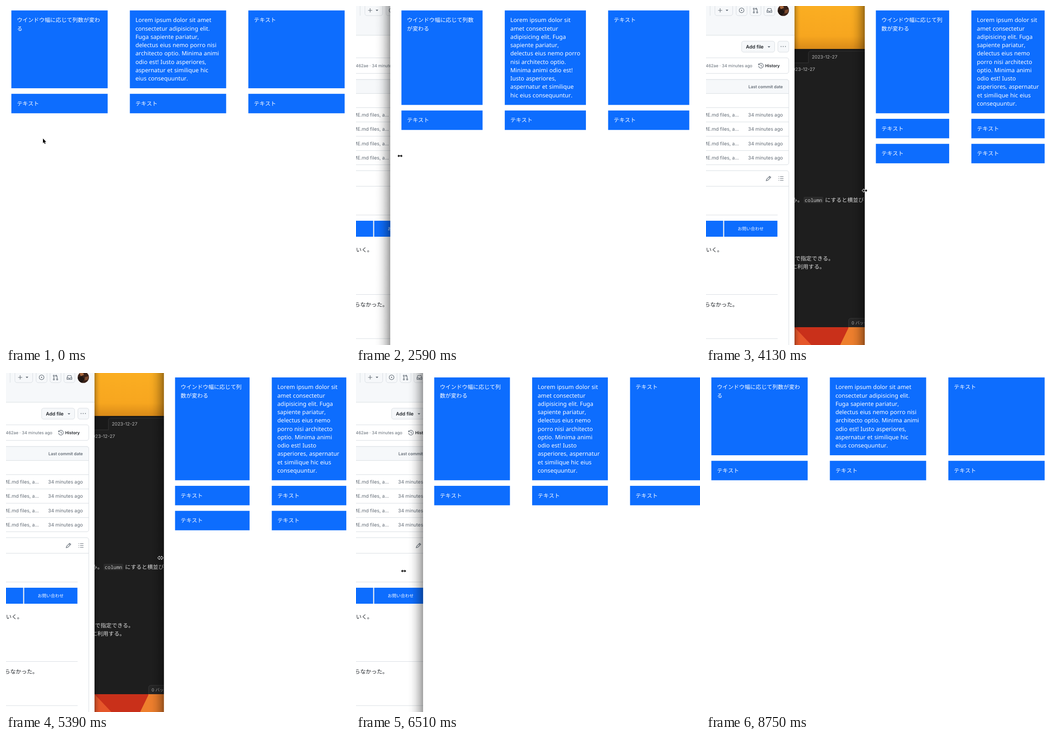
Recreate the animation shown at these times as an HTML page with a canvas. Size 754x742 px, loop 9.45 s.

```html
<!DOCTYPE html>
<html lang="ja">
<head>
<meta charset="utf-8">
<title>Responsive grid</title>
<style>
html, body { margin: 0; width: 100%; height: 100%; overflow: hidden; background: #fff; }
canvas { display: block; }
</style>
</head>
<body>
<canvas id="stage" width="754" height="742"></canvas>
<script>
const W = 754, H = 742, LOOP = 9450, STEP = 70;
const ctx = document.getElementById('stage').getContext('2d');
const JP = '"Noto Sans CJK JP", "Noto Sans CJK", sans-serif';
const UI = 'Inter, "Noto Sans CJK JP", sans-serif';
const BLUE = '#0d6dfe', LINE = '#d8dde2', INK = '#1f2328', GREY = '#636c76';

// Page metrics: one rem on the scaled screen
const REM = 12.167, LH = REM * 1.5, RIGHT = 766.6, MIN_COL = REM * 12.5;
const LOREM = 'Lorem ipsum dolor sit amet consectetur adipisicing elit. Fuga sapiente pariatur, delectus eius nemo porro nisi architecto optio. Minima animi odio est! Iusto asperiores, aspernatur et similique hic eius consequuntur.';
const CARDS = ['ウインドウ幅に応じて列数が変わる', LOREM, 'テキスト', 'テキスト', 'テキスト', 'テキスト'];

// [time, value]
const EDGE = [[0, -12.6], [2230, -12.6], [2520, 60], [3080, 174], [3600, 262], [4130, 348],
  [5320, 348], [5600, 325], [5880, 270.7], [6160, 243], [6200, 243], [6650, 90],
  [7070, -44], [7350, -44], [8120, -12.6], [9450, -12.6]];
const HAND_Y = [[0, 316], [2230, 316], [3080, 358], [4130, 404], [5320, 404], [5880, 422], [7070, 438], [9450, 438]];
const ARROW_X = [[0, 81], [140, 48], [350, 6], [490, 6]];
const ARROW_Y = [[0, 290], [350, 302], [490, 302]];

function slope(k, i) {
  if (i === 0 || i === k.length - 1) return 0;
  const [a, b, c] = [k[i - 1], k[i], k[i + 1]];
  if ((b[1] - a[1]) * (c[1] - b[1]) <= 0) return 0;
  return (c[1] - a[1]) / (c[0] - a[0]);
}

// Smooth curve through keys, flat at turning points
function curve(k, t) {
  if (t <= k[0][0]) return k[0][1];
  const i = k.findIndex(p => p[0] > t) - 1;
  if (i < 0) return k[k.length - 1][1];
  const [t0, a] = k[i], [t1, b] = k[i + 1];
  const d = t1 - t0, s = (t - t0) / d, s2 = s * s, s3 = s2 * s;
  return a + (b - a) * (3 * s2 - 2 * s3)
    + d * (s - 2 * s2 + s3) * slope(k, i) + d * (s3 - s2) * slope(k, i + 1);
}

function rect(x, y, w, h, fill) {
  ctx.fillStyle = fill;
  ctx.fillRect(x, y, w, h);
}

function box(x, y, w, h, r, fill, stroke) {
  ctx.beginPath();
  ctx.roundRect(x, y, w, h, r);
  if (fill) { ctx.fillStyle = fill; ctx.fill(); }
  if (stroke) { ctx.strokeStyle = stroke; ctx.lineWidth = 1; ctx.stroke(); }
}

function poly(points, fill) {
  ctx.beginPath();
  points.forEach(([x, y]) => ctx.lineTo(x, y));
  ctx.closePath();
  ctx.fillStyle = fill;
  ctx.fill();
}

function label(str, x, y, font, fill, align = 'left') {
  ctx.font = font;
  ctx.fillStyle = fill;
  ctx.textAlign = align;
  ctx.fillText(str, x, y);
}

function icon(path, x, y, color = GREY, width = 1.2) {
  ctx.save();
  ctx.translate(x, y);
  ctx.strokeStyle = color;
  ctx.lineWidth = width;
  ctx.stroke(new Path2D(path));
  ctx.restore();
}

function shadow(x, y, h, size, alpha) {
  const g = ctx.createLinearGradient(x, 0, x + size, 0);
  const from = size > 0 ? 0 : 1;
  for (let i = 0; i <= 4; i++) g.addColorStop(i / 4, `rgba(0,0,0,${alpha * (1 - i / 4) ** 2})`);
  rect(Math.min(x, x + size), y, Math.abs(size), h, g);
}

function drawWallpaper() {
  const top = ctx.createLinearGradient(0, 0, 0, 94);
  top.addColorStop(0, '#fbae22');
  top.addColorStop(.7, '#f7a61f');
  top.addColorStop(1, '#d98a18');
  rect(190, 0, 170, 94, top);
  rect(190, 703, 170, 39, '#c9301a');
  poly([[194, 703], [194, 742], [231, 742]], '#e5562a');
  poly([[313, 703], [360, 703], [360, 742], [294, 742]], '#ee7f2d');
}

function drawEditor() {
  rect(190, 94, 170, 609, '#1e1e1e');
  rect(190, 94, 170, 30, '#191919');
  box(224.5, 98.5, 160, 26, [5, 0, 0, 0], '#1e1e1e', '#353535');
  rect(190, 124, 34, 1, '#353535');
  rect(225, 124, 140, 2, '#1e1e1e');
  label('2023-12-27', 232, 114.5, '10px ' + UI, '#b9b9b9');
  label('2023-12-27', 239, 141.5, '10px ' + UI, '#b9b9b9', 'right');
  const font = '12.17px ' + JP, ink = '#dadada';
  label('み。', 188, 428.5, font, ink);
  box(214, 417.5, 43, 14, 3, '#2b2b2b');
  label('column', 216.3, 428.5, '10.7px "Noto Sans Mono", monospace', '#c8c8c8');
  label('にすると横並び', 261, 428.5, font, ink);
  label('で指定できる。', 195, 556.5, font, ink);
  label('に利用する。', 188, 574.8, font, ink);
  box(312.5, 683.5, 80, 24, [5, 0, 0, 0], '#262626', '#383838');
  rect(312, 703, 50, 6, '#ee7f2d');
  label('0 バックリンク', 319, 696.5, '9.2px ' + UI, '#b0b0b0');
}

function caret(x, y) {
  poly([[x - 3, y - 1.5], [x + 3, y - 1.5], [x, y + 1.8]], GREY);
}

function drawToolbar() {
  rect(0, 0, 194, 64, '#f6f8fa');
  rect(0, 63.5, 194, 1, LINE);
  rect(8.5, 0, 1, 21, LINE);
  for (const [x, w] of [[19.5, 39], [66, 24], [96.5, 24], [127, 24]]) box(x, -3, w, 24, 4.5, '#f6f8fa', LINE);
  icon('M-4.5 0H4.5M0-4.5V4.5', 31, 9.5);
  caret(46, 9.5);
  icon('M5.2 0A5.2 5.2 0 1 1-5.2 0A5.2 5.2 0 1 1 5.2 0M.7 0A.7.7 0 1 1-.7 0A.7.7 0 1 1 .7 0', 78, 9.5);
  icon('M-3.5-2V3M-2.2-3.6A1.4 1.4 0 1 1-5-3.6A1.4 1.4 0 1 1-2.2-3.6M-2.2 4.4A1.4 1.4 0 1 1-5 4.4A1.4 1.4 0 1 1-2.2 4.4M5 4.4A1.4 1.4 0 1 1 2.2 4.4A1.4 1.4 0 1 1 5 4.4M3.6 3V-2Q3.6-3.6 2-3.6H.2M2-5.6L0-3.6L2-1.6', 108.5, 9.5);
  icon('M-5.3 1L-3.4-4H3.4L5.3 1V4.4H-5.3ZM-5.3 1H-2L-1 2.6H1L2 1H5.3', 139, 9.5);
  ctx.save();
  ctx.beginPath();
  ctx.arc(169.5, 9.5, 12.3, 0, 7);
  ctx.clip();
  rect(157, -3, 26, 26, '#3a2219');
  poly([[157, 10], [166, 6], [172, 13], [165, 23], [157, 23]], '#1f1512');
  poly([[161, 0], [168, -2], [171, 4], [164, 7]], '#a8673c');
  poly([[173, 9], [181, 7], [179, 15], [172, 16]], '#7c4a2e');
  ctx.restore();
}

function drawRepo() {
  rect(0, 0, 194, H, '#fff');
  drawToolbar();
  const small = '9.1px ' + UI, medium = '10.4px ' + UI, bold = '600 9.1px ' + UI;
  box(78, 77, 72.5, 24, 4.5, '#f6f8fa', LINE);
  label('Add file', 87.5, 92.7, '600 10.4px ' + UI, INK);
  caret(138, 89.5);
  box(157.5, 77, 24, 24, 4.5, '#f6f8fa', LINE);
  for (const x of [164.5, 169.2, 174]) rect(x - .8, 87.8, 1.7, 1.7, GREY);

  box(-20, 113.5, 201.5, 34, 4.5, '#fff', LINE);
  label('b7462ae · 34 minutes ago', 101.5, 134.3, small, GREY, 'right');
  icon('M-4.6-2.4A5.2 5.2 0 1 1-5.2.8M-5.3-4.6V-1.8H-2.5M0-2.8V.4L2.2 1.6', 120.5, 130.5);
  label('History', 129.8, 134.3, bold, INK);

  box(-20, 161, 201.5, 186.5, 4.5, '#fff', LINE);
  box(-20, 161, 201.5, 30.5, [4.5, 4.5, 0, 0], '#f6f8fa', LINE);
  label('Last commit date', 168.5, 179.8, bold, GREY, 'right');
  for (let i = 0; i < 4; i++) {
    const y = 222 + i * 31.3;
    rect(0, y, 181, 1, LINE);
    label('README.md files, a...', 72, y + 20, medium, GREY, 'right');
    label('34 minutes ago', 168.5, y + 20, medium, GREY, 'right');
  }

  box(-20, 360.5, 201.5, 420, 4.5, '#fff', LINE);
  rect(0, 394, 181, 1, LINE);
  icon('M-5 5L-4.2 1.8L2.6-5L5-2.6L-1.8 4.2ZM1-3.4L3.4-1', 137, 377.5);
  icon('M-2-4H5.5M-2 0H5.5M-2 4H5.5M-5.5-4H-4M-5.5 0H-4M-5.5 4H-4', 164.3, 377.5);
  for (const y of [457, 631, 727.5]) rect(0, y, 157, 1, LINE);
  rect(0, 470, 156.5, 35, '#e4eaf2');
  rect(0, 470, 37.5, 35, BLUE);
  rect(40, 470, 116.5, 35, BLUE);
  label('お問い合わせ', 98, 490.8, '9.5px ' + JP, '#fff', 'center');
  label('いく。', 0, 537.5, '12.17px ' + JP, INK);
  label('らなかった。', -3, 657.5, '12.17px ' + JP, INK);
}

function cardFont(str) {
  const latin = str === LOREM;
  ctx.font = latin ? '12.7px "Noto Sans", sans-serif' : `${REM}px ${JP}`;
  ctx.wordSpacing = latin ? '0.35px' : '0px';
}

function wrap(str, width) {
  cardFont(str);
  const gap = str === LOREM ? ' ' : '';
  const lines = [];
  let line = '';
  for (const part of str.split(gap)) {
    const next = line ? line + gap + part : part;
    if (line && ctx.measureText(next).width > width) {
      lines.push(line);
      line = part;
    } else line = next;
  }
  return lines.concat(line);
}

function drawGrid(left, width) {
  const gap = REM * 4, inner = width - REM * 4;
  const cols = Math.max(1, Math.floor((inner + gap) / (MIN_COL + gap)));
  const w = (inner - gap * (cols - 1)) / cols;
  const texts = CARDS.map(c => wrap(c, w - REM * 2));
  ctx.textAlign = 'left';
  let y = 9.7;
  for (let i = 0; i < CARDS.length; i += cols) {
    const row = texts.slice(i, i + cols);
    const h = Math.max(...row.map(l => l.length)) * LH + REM * 2;
    row.forEach((lines, c) => {
      const x = left + REM * 2 + c * (w + gap);
      rect(x, y, w, h, BLUE);
      cardFont(CARDS[i + c]);
      ctx.fillStyle = '#fff';
      lines.forEach((l, n) => ctx.fillText(l, x + REM, y + REM + 13.6 + n * LH));
    });
    y += h + REM;
  }
  ctx.wordSpacing = '0px';
}

function pointer(path, x, y) {
  ctx.save();
  ctx.translate(x, y);
  const p = new Path2D(path);
  ctx.lineJoin = 'round';
  ctx.strokeStyle = '#fff';
  ctx.lineWidth = 1.8;
  ctx.stroke(p);
  ctx.fillStyle = '#000';
  ctx.fill(p);
  ctx.restore();
}

function draw(t) {
  ctx.fontKerning = 'none';
  ctx.textRendering = 'geometricPrecision';
  ctx.textBaseline = 'alphabetic';
  const left = curve(EDGE, t);
  rect(0, 0, W, H, '#fff');
  if (left > 0) {
    drawWallpaper();
    drawEditor();
    shadow(194, 0, H, 14, .3);
    drawRepo();
    shadow(left, 0, H, -34, .38);
  }
  rect(left, 0, W - left, H, '#fff');
  // The page reflows slightly ahead of the window frame
  drawGrid(left, RIGHT - curve(EDGE, t + 55));
  if (t < 490) {
    pointer('M0 0V10.2L2.3 8.1L3.9 11.9L5.6 11.2L4 7.5H7.2Z', curve(ARROW_X, t), curve(ARROW_Y, t));
  } else {
    pointer('M-5.4 0L-2.2-3.2V-.8H2.2V-3.2L5.4 0L2.2 3.2V.8H-2.2V3.2Z', curve(EDGE, t + 100), curve(HAND_Y, t));
  }
}

function tick() {
  const t = performance.now() % LOOP;
  draw(Math.floor(t / STEP) * STEP);
  requestAnimationFrame(tick);
}
tick();
</script>
</body>
</html>
```
